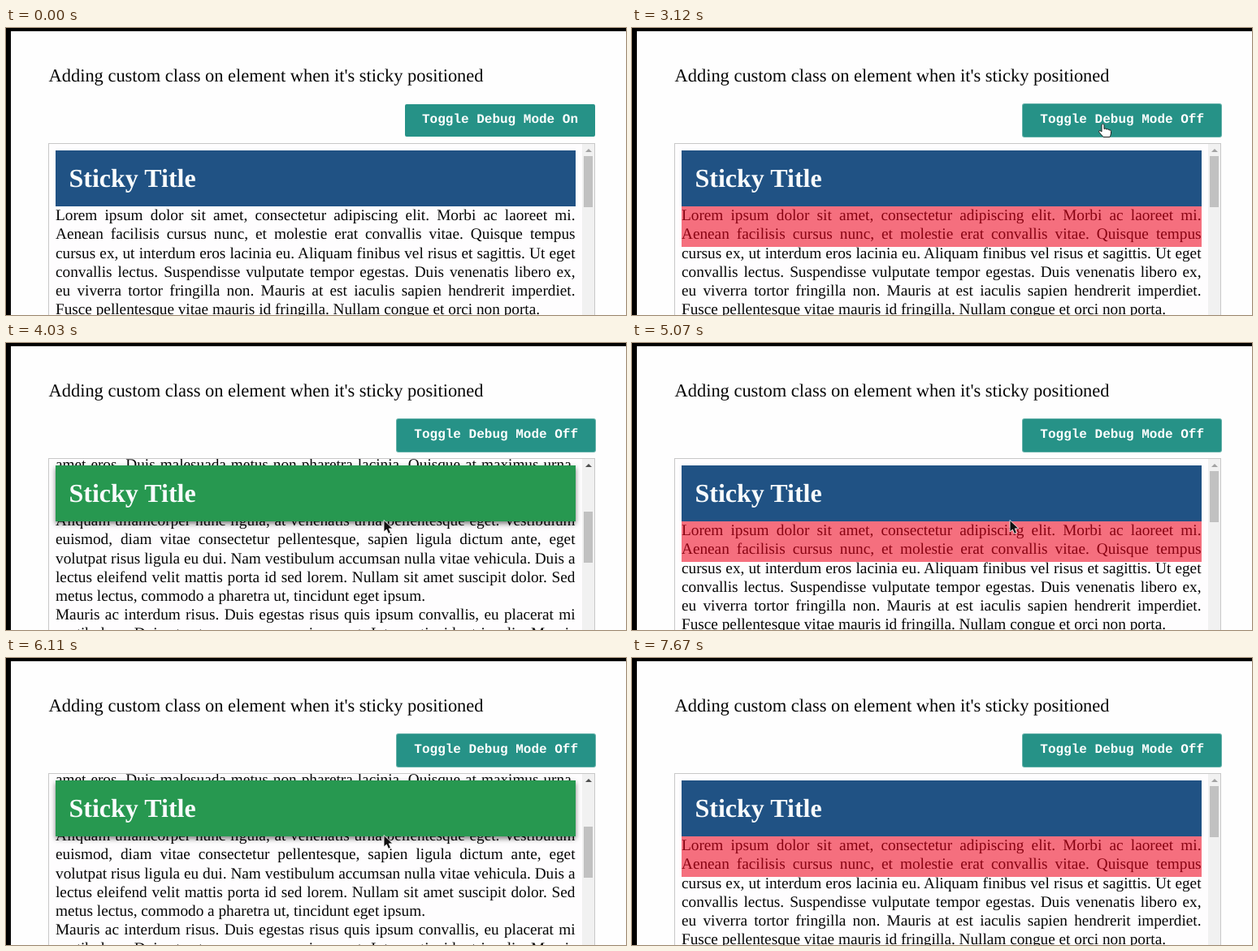
An HTML page for the animation above (7930 ms loop, 763 px wide and 354 px high).

```html
<!DOCTYPE html>
<html lang="en">
<head>
<meta charset="utf-8">
<title>Sticky title</title>
<style>
html, body { margin: 0; width: 100%; height: 100%; overflow: hidden; background: #000; }
body { position: relative; font: 19.25px/23.2px "Liberation Serif", "Times New Roman", serif; color: #060606; text-rendering: geometricPrecision; }
body *, body svg { position: absolute; box-sizing: border-box; white-space: nowrap; }
#page { left: 6px; top: 4px; right: 0; bottom: 0; background: #fefefe; }
h1 { left: 52.5px; top: 46px; margin: 0; font-size: 22.45px; line-height: 26px; font-weight: 400; }
#button { right: 38px; top: 94px; height: 40px; padding: 0 21px; border-radius: 2px; background: #269287; color: #fff;
  font: bold 16px/38px "Liberation Mono", "Courier New", monospace; }
#button.on { box-shadow: 0 0 0 1px #62b0a8; }
#box { left: 52px; top: 142px; width: 673px; height: 300px; border: 1px solid #c8c8c8; background: #fefdfe; overflow: hidden; }
#text { left: 8px; width: 640px; }
#text p { margin: 0; width: 639.5px; height: 23.2px; text-align-last: justify; }
#text .end { text-align-last: left; }
#mark { left: 0; top: 0; width: 640px; height: 50px; background: rgba(239, 0, 27, .56); }
#title { left: 8px; top: 8px; width: 640px; height: 69px; padding-left: 16.5px; margin: 0;
  font: bold 32px/69px "Liberation Serif", "Times New Roman", serif; color: #f8fbfc; background: #205284; }
#title.stuck { background: #279850; box-shadow: 0 3px 6px rgba(0, 0, 0, .5); }
#track { right: 0; top: 0; width: 15px; height: 100%; background: #f1f1f1; }
#thumb { left: 2px; width: 11px; height: 63px; background: #c1c1c1; }
#up { left: 4px; top: 6px; border: solid transparent; border-width: 0 4px 4px; }
#cursor { left: 0; top: 0; width: 24px; height: 28px; overflow: visible; }
</style>
</head>
<body>
<div id="page"></div>
<h1>Adding custom class on element when it's sticky positioned</h1>
<div id="button"></div>
<div id="box">
  <div id="text"></div>
  <h2 id="title">Sticky Title</h2>
  <div id="track"><div id="up"></div><div id="thumb"></div></div>
</div>
<svg id="cursor" stroke-linejoin="round">
  <path id="arrow" d="M0 0V14.5L3.4 11.5L5.6 16.8L8.4 15.6L6.2 10.4H10.8Z" fill="#111" stroke="#fff" stroke-width=".8"/>
  <path id="hand" d="M0 1.5Q1.5-.8 3 1.5V6.5Q5 5.2 6 7Q8 6 9 7.8Q11.5 7 11.5 9.5V12Q11 14.5 10 16.5H2Q-1 13-3.5 10Q-3.5 7.5-1 9L0 10Z" fill="#fff" stroke="#222"/>
</svg>
<script>
const LOOP = 7930, STEP = 130, DOWN = 383.3;
const $ = id => document.getElementById(id);

// A trailing "|" ends a paragraph.
const lines = `Lorem ipsum dolor sit amet, consectetur adipiscing elit. Morbi ac laoreet mi.
Aenean facilisis cursus nunc, et molestie erat convallis vitae. Quisque tempus
cursus ex, ut interdum eros lacinia eu. Aliquam finibus vel risus et sagittis. Ut eget
convallis lectus. Suspendisse vulputate tempor egestas. Duis venenatis libero ex,
eu viverra tortor fringilla non. Mauris at est iaculis sapien hendrerit imperdiet.
Fusce pellentesque vitae mauris id fringilla. Nullam congue et orci non porta.|
Integer sed lorem vitae nibh feugiat dictum. Praesent at ligula non sem porta
mattis. Vivamus in augue eget purus commodo tincidunt. Sed at ipsum vel justo
pharetra dapibus. Donec ut metus sed nulla efficitur cursus. Nam vitae tortor sed
lectus rhoncus gravida. Curabitur a sapien in magna tempus aliquet eu id urna.
Phasellus nec dolor sit amet velit congue luctus. Etiam non libero ac massa mollis.|
Maecenas at turpis vel leo egestas posuere. Proin euismod nisl ut arcu porttitor,
vitae semper quam dignissim. Nulla facilisi. Cras ac mauris in risus blandit sit
amet eros. Duis malesuada metus non pharetra lacinia. Quisque at maximus urna,
sed vulputate nibh. Vivamus tempor elit eget nunc pretium, a congue dui mattis.
Donec non sapien id lacus viverra faucibus. Integer at magna vel enim pulvinar.|
Aliquam ullamcorper nunc ligula, at venenatis urna pellentesque eget. Vestibulum
euismod, diam vitae consectetur pellentesque, sapien ligula dictum ante, eget
volutpat risus ligula eu dui. Nam vestibulum accumsan nulla vitae vehicula. Duis a
lectus eleifend velit mattis porta id sed lorem. Nullam sit amet suscipit dolor. Sed
metus lectus, commodo a pharetra ut, tincidunt eget ipsum.|
Mauris ac interdum risus. Duis egestas risus quis ipsum convallis, eu placerat mi
vestibulum. Duis at rutrum urna, a maximus est. Integer tincidunt iaculis. Mauris
sed dolor nec arcu luctus pretium. Nunc vitae justo at elit tempor fermentum.`.split("\n");

lines.forEach((line, i) => {
  const p = document.createElement("p");
  p.textContent = line.replace("|", "");
  p.style.top = i * 23.2 + "px";
  if (line.endsWith("|")) p.className = "end";
  $("text").append(p);
});
const mark = document.createElement("div");
mark.id = "mark";
$("text").append(mark);

// Keys are [time, value, ...]; motion between them is eased.
function tween(keys, t, n = 1) {
  const i = keys.findIndex(k => k[0] > t);
  if (i < 0) return keys.at(-1)[n];
  if (i === 0) return keys[0][n];
  const a = keys[i - 1], b = keys[i];
  const u = (t - a[0]) / (b[0] - a[0]);
  return a[n] + (b[n] - a[n]) * u * u * (3 - 2 * u);
}

const scrolls = [[3510, 0], [4030, DOWN], [4420, DOWN], [5070, 0], [5330, 0], [6110, DOWN], [6890, DOWN], [7410, 0]];
const moves = [[0, 640, 380], [780, 578, 118], [3120, 578, 118], [3510, 465, 218.5], [7150, 465, 218.5], [7670, 520, 380]];

function draw(t) {
  const debug = t >= 1040, scroll = tween(scrolls, t);
  const x = tween(moves, t), y = tween(moves, t, 2);
  const over = x > 480 && x < 725 && y > 94 && y < 134;
  $("button").textContent = "Toggle Debug Mode " + (debug ? "Off" : "On");
  $("button").className = debug ? "on" : "";
  mark.style.display = debug ? "block" : "none";
  $("text").style.top = 77.2 - scroll + "px";
  $("title").className = scroll > 127 ? "stuck" : "";
  $("thumb").style.top = 15 + scroll / DOWN * 50 + "px";
  $("up").style.borderBottomColor = scroll > 0 ? "#505050" : "#a3a3a3";
  $("cursor").style.transform = `translate(${x}px, ${y}px)`;
  $("hand").style.display = over ? "" : "none";
  $("arrow").style.display = over ? "none" : "";
}

const start = performance.now();
function frame() {
  const t = (performance.now() - start) % LOOP;
  draw(Math.floor(t / STEP) * STEP);
  requestAnimationFrame(frame);
}
frame();
</script>
</body>
</html>
```
